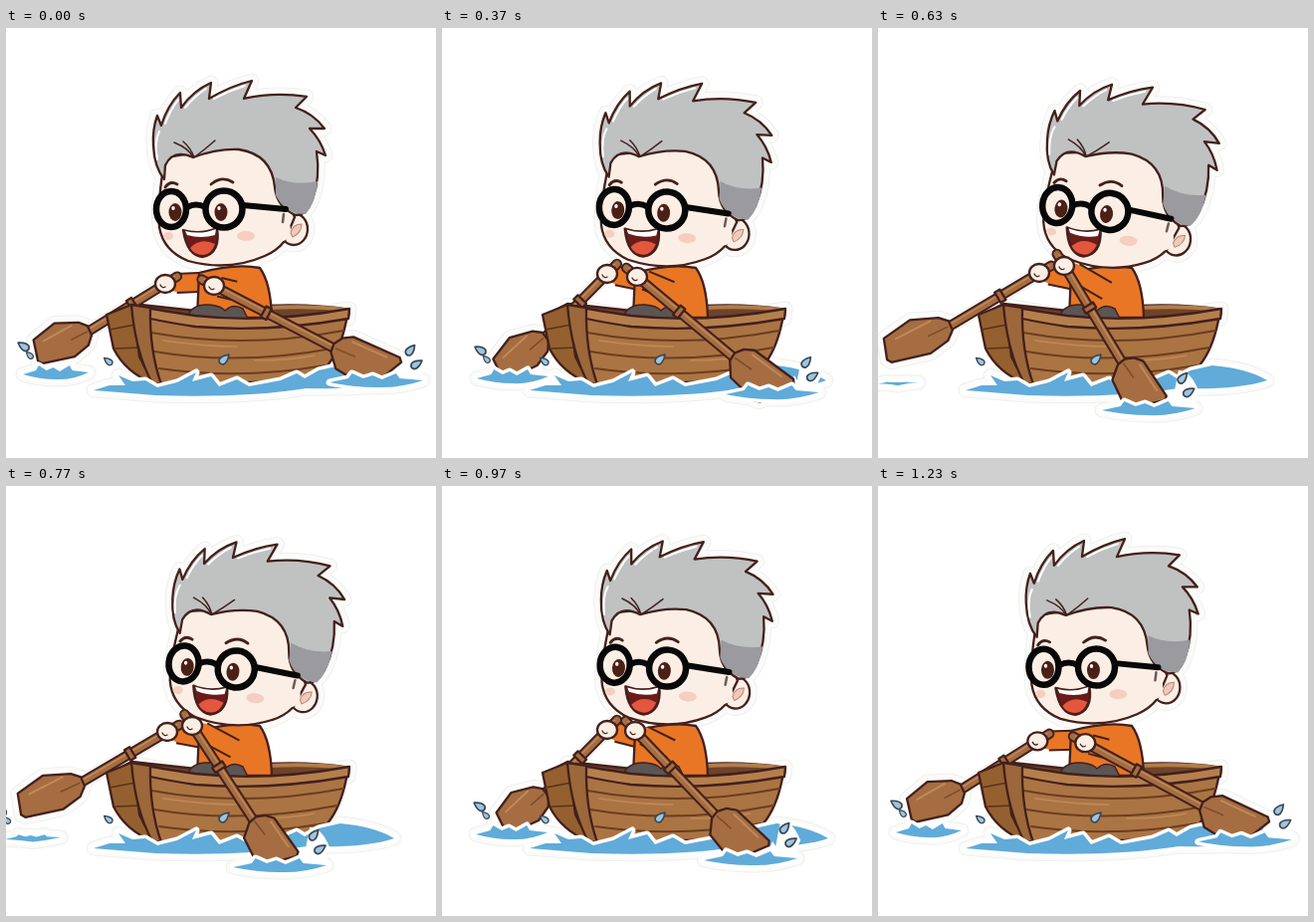
Recreate the animation shown at these times as an HTML page with a canvas. Size 432 px wide and 432 px high, loop 1260 ms.

```html
<!DOCTYPE html>
<html lang="en">
<head>
<meta charset="utf-8">
<title>Rowing</title>
<style>
  html, body { margin: 0; width: 100%; height: 100%; overflow: hidden; background: #fff; }
  canvas { display: block; width: 432px; height: 432px; }
</style>
</head>
<body>
<canvas id="stage"></canvas>
<script>
const canvas = document.getElementById('stage');
const ctx = canvas.getContext('2d');
const ratio = window.devicePixelRatio || 1;
canvas.width = canvas.height = 432 * ratio;
ctx.lineJoin = ctx.lineCap = 'round';

const LOOP = 1260;
const INK = '#43201c', SKIN = '#fbeee4', ORANGE = '#e87625', WOOD = '#a56d41', SHINE = '#c08a58', BLUE = '#60abd9';

// Pose values at the key times; the loop closes on the first one.
const times = [0, 170, 370, 630, 770, 970];
const tracks = {
  lean: [0, .5, 3.3, 6.8, 6, 3.7],
  nearHandX: [209, 202, 196, 187, 187, 194],
  nearHandY: [259, 256, 250, 239, 241, 246],
  nearNeckX: [328, 314, 292, 245, 248, 274],
  nearNeckY: [321, 325, 330, 335, 335, 330],
  nearLength: [68, 68, 65, 56, 55, 60],
  nearPoolX: [372, 350, 332, 272, 275, 310],
  nearPoolY: [354, 356, 366, 382, 381, 374],
  farHandX: [160, 163, 166, 162, 162, 166],
  farHandY: [257, 252, 247, 246, 247, 245],
  farNeckX: [84, 99, 104, 73, 77, 104],
  farNeckY: [304, 308, 310, 299, 297, 308],
  farLength: [58, 60, 58, 70, 68, 54],
  farPoolX: [50, 66, 71, 20, 27, 70],
  farPoolY: [346, 347, 350, 356, 353, 348],
  farPoolW: [33, 37, 36, 21, 28, 36],
  shoreX: [418, 404, 386, 391, 390, 388]
};

// Periodic cubic interpolation through unevenly spaced keys.
function sample(values, t) {
  const n = times.length;
  let i = n - 1;
  while (times[i] > t) i--;
  const at = k => times[(k + n) % n] + LOOP * Math.floor(k / n);
  const val = k => values[(k + n) % n];
  const slope = k => (val(k + 1) - val(k - 1)) / (at(k + 1) - at(k - 1));
  const d = at(i + 1) - at(i), u = (t - at(i)) / d, v = 1 - u;
  return val(i) * v * v * (1 + 2 * u) + val(i + 1) * u * u * (3 - 2 * u)
    + d * u * v * (slope(i) * v - slope(i + 1) * u);
}

function shape(path, fill, stroke, width = 2.3) {
  const p = new Path2D(path);
  if (fill) { ctx.fillStyle = fill; ctx.fill(p); }
  if (stroke) { ctx.strokeStyle = stroke; ctx.lineWidth = width; ctx.stroke(p); }
}

function oval(x, y, rx, ry, fill, stroke, width = 2.3) {
  const p = new Path2D();
  p.ellipse(x, y, rx, ry, 0, 0, 7);
  shape(p, fill, stroke, width);
}

function placed(x, y, angle, draw) {
  ctx.save();
  ctx.translate(x, y);
  ctx.rotate(angle);
  draw();
  ctx.restore();
}

function leaning(pose, draw) {
  placed(206, 300, pose.lean * Math.PI / 180, () => {
    ctx.translate(-206, -300);
    draw();
  });
}

const hair = 'M159 152Q149 140 148 118Q147 102 152 88L156 98Q162 78 175 65L176 80Q188 63 206 55L204 71Q226 58 247 53L239 71Q270 64 302 69L291 80Q309 86 320 101L305 101Q316 112 321 128L312 124Q316 150 308 172Q302 188 291 188Q272 180 270 160Q267 127 234 122Q212 121 188 130Q168 121 160 138Z';
const face = 'M160 130Q152 172 154 200Q158 224 183 234Q224 245 260 229Q272 224 280 214L290 190L271 150Q262 118 230 119Z';
const hull = 'M128 284Q190 298 262 300Q310 298 343 288Q338 318 326 335Q316 350 290 354L160 360Q142 350 134 330Z';
const bowSide = 'M101 288L126 278L148 357Q120 346 108 322Z';
const rim = 'M126 278Q150 283 190 289Q262 297 345 282L344 292Q265 306 190 300Q150 294 129 288Z';

function head() {
  oval(289, 202, 14, 16, SKIN, INK);
  shape(face, SKIN, INK);
  oval(278, 203, 8, 11, SKIN);
  shape('M286 206Q288 197 297 197Q297 206 288 210Z', '#f0c9ba', '#b98476', 1);
  shape(hair, '#c0c2c2', INK);
  shape('M152 132Q149 114 154 104M160 96Q165 82 173 72M180 80Q190 68 201 61M209 71Q224 63 240 58', null, '#fff', 2);
  shape('M271 150Q290 159 313 154Q311 176 301 187Q280 187 271 168Z', '#9b9a9f');
  shape('M169 115Q184 121 188 130M178 114Q186 121 189 130M189 130Q200 122 210 113', null, INK, 1.5);
  shape('M160 160Q165 153 172 157M206 157Q217 148 228 155', null, INK, 2.8);

  oval(241, 209, 9, 5, '#f5cdc1');
  oval(163, 209, 5, 4, '#f5cdc1');
  shape('M178 203Q195 208 212 201Q216 226 198 230Q182 229 178 203Z', '#6b1c1a', INK);
  shape('M180 204Q196 208 211 202L210 208Q196 212 182 208Z', '#fff');
  shape('M185 221Q195 210 210 217Q206 228 198 228Q189 228 185 221Z', '#e2573d');

  oval(166, 182, 15, 18, SKIN, '#080808', 6.5);
  oval(219, 182, 18.5, 18.5, SKIN, '#080808', 6.5);
  shape('M182 180Q191 175 200 180M238 178L281 182', null, '#080808', 6);
  shape('M279 187L278 195', null, '#6d5a58', 2.5);
  for (const x of [170, 216]) {
    oval(x, 185, 6.5, 9, '#4a2017');
    oval(x - 2, 181, 1.7, 2, '#fff');
  }
}

const blades = {
  near: [[0, -4], [6, -12], [16, -17], [66, -13], [69, -9], [49, 24], [44, 26], [10, 19], [0, 5]],
  far: [[0, -5], [8, -12], [34, -21], [64, -14], [69, 7], [66, 11], [28, 18], [8, 13], [0, 5]]
};

function bladePath(side, length) {
  return 'M' + blades[side].map(([x, y]) => `${x * length / 67} ${y}`).join('L') + 'Z';
}

// Maps the oar to its own axis: hand on the left, neck at the origin.
function withOar(pose, side, draw) {
  const get = name => pose[side + name];
  const dx = get('NeckX') - get('HandX'), dy = get('NeckY') - get('HandY');
  placed(get('NeckX'), get('NeckY'), Math.atan2(dy, dx), () => {
    if (side === 'far') ctx.scale(1, -1);
    draw(Math.hypot(dx, dy), get('Length'));
  });
}

function oar(pose, side) {
  withOar(pose, side, (reach, length) => {
    const shaft = `M${-reach - 14} 0L4 0`;
    shape(shaft, null, INK, 10.5);
    shape(shaft, null, WOOD, 6.5);
    shape(`M${-reach - 12}-1.5L0-1.5`, null, SHINE, 1.5);
    shape(`M${-reach * .56 - 3}-6h6v12h-6Z`, WOOD, INK);
    ctx.rotate(-.14);
    shape(bladePath(side, length), WOOD, INK);
    shape(`M${length * .25}-12L${length * .8}-9`, null, SHINE, 2);
    shape(`M${length * .05} 0L${length * .35} 1`, null, '#7b4a28', 1.5);
  });
}

function waterPath(x) {
  return `M88 364L104 359L120 359L113 349L127 355L140 354L152 361L172 356L191 346L187 355L206 350L214 360L232 353L244 360L276 354L292 347L300 352L314 344L336 339Q${x - 20} 342 ${x} 354Q360 364 302 362Q240 372 150 369Z`;
}

function poolPath(x, y, w) {
  const k = Math.min(1, (w / 33) ** 6);
  const points = [[-.6, -2], [-.52, -7], [-.28, -2], [-.08, -5], [.12, -1], [.42, -7], [.5, -2]];
  return `M${x - w} ${y + 2}` + points.map(([u, v]) => `L${x + u * w} ${y + v * k}`).join('')
    + `L${x + w} ${y}Q${x + w / 2} ${y + 8 * k} ${x} ${y + 3 + 4 * k}Q${x - w / 2} ${y + 7 * k} ${x - w} ${y + 2}Z`;
}

function water(path) {
  shape(path, null, '#fff', 7);
  shape(path, BLUE);
}

function spray(x, y) {
  placed(x, y, 0, () => shape('M2 2L12-8L16-5L22-17L25-12L30-38Q42-38 50-18L46-10L50 0Z', '#fff'));
}

function drop(x, y, angle, size = 1) {
  placed(x, y, angle, () => {
    ctx.scale(size, size);
    shape('M0-7Q5 0 3 4Q0 7-3 4Q-5 0 0-7Z', '#9cc5de', '#3b4654', 1.7);
  });
}

function arm(x, y, handX, handY) {
  const path = `M${x} ${y}L${handX + (x - handX) * .25} ${handY + (y - handY) * .25}`;
  ctx.lineCap = 'butt';
  shape(path, null, INK, 21);
  ctx.lineCap = 'round';
  shape(path, null, ORANGE, 17);
}

function hand(x, y) {
  oval(x, y, 10, 9, SKIN, INK);
  shape(`M${x - 5} ${y + 1}Q${x - 3} ${y + 5} ${x} ${y + 3}`, null, INK, 1.3);
}

// Pale sticker border around every part.
function border(pose, pools, color, extra) {
  const edge = path => shape(path, null, color, extra);
  leaning(pose, () => {
    edge(hair);
    edge(face);
    oval(289, 202, 14, 16, null, color, extra);
  });
  [rim, waterPath(pose.shoreX), ...pools].forEach(edge);
  for (const side of ['far', 'near']) {
    withOar(pose, side, (reach, length) => {
      edge(`M${-reach - 10} 0L0 0`);
      ctx.rotate(-.14);
      edge(bladePath(side, length));
    });
  }
}

function boatBack() {
  shape('M103 289L126 277L190 284L262 279Q310 277 345 283L344 290L262 300L150 290Z', '#6d432a', INK);
  shape('M264 281Q310 279 340 283', null, '#b27c4b', 4);
}

function torso() {
  shape('M194 246Q230 236 255 241Q266 256 267 291L192 291Z', ORANGE, INK);
  shape('M182 291Q186 277 204 278Q216 279 220 284Q228 276 238 282L244 294Z', '#5b5554', INK, 1.5);
}

function boatFront() {
  shape(bowSide, '#94602f', INK);
  shape('M104 303L130 298M110 322L136 321', null, '#5c3119', 1.7);
  shape(hull, '#ab7443', INK);
  shape('M146 306Q240 323 339 304M149 325Q235 340 333 321M154 342Q235 354 320 339', null, '#6b3d20', 2);
  shape('M158 314Q200 320 232 320M250 334Q285 334 310 329', null, SHINE, 1.5);
  shape(rim, '#b57f4d', INK);
  shape('M126 278L145 281Q144 324 156 358L147 357Q130 326 126 278Z', '#9c673a', INK);
}

function render(t) {
  const pose = {};
  for (const name in tracks) pose[name] = sample(tracks[name], t);
  const { nearPoolX, nearPoolY, farPoolX, farPoolY } = pose;
  const nearPool = poolPath(nearPoolX, nearPoolY, 47);
  const farPool = poolPath(farPoolX, farPoolY, pose.farPoolW);

  ctx.setTransform(ratio, 0, 0, ratio, 0, 0);
  ctx.fillStyle = '#fff';
  ctx.fillRect(0, 0, 432, 432);
  border(pose, [nearPool, farPool], '#eeefec', 15);
  border(pose, [nearPool, farPool], '#fbfcfa', 13);

  boatBack();
  arm(205, 255, pose.farHandX, pose.farHandY);
  torso();
  oar(pose, 'far');
  water(farPool);
  boatFront();
  leaning(pose, head);
  arm(230, 264, pose.nearHandX, pose.nearHandY);
  water(waterPath(pose.shoreX));
  spray(nearPoolX, nearPoolY);
  oar(pose, 'near');
  water(nearPool);
  hand(pose.farHandX, pose.farHandY);
  hand(pose.nearHandX, pose.nearHandY);

  drop(nearPoolX + 34, nearPoolY - 30, .7);
  drop(nearPoolX + 40, nearPoolY - 16, 1);
  drop(farPoolX - 32, farPoolY - 26, -1);
  drop(farPoolX - 26, farPoolY - 17, -.8, .7);
  drop(103, 335, -.9, .8);
  drop(219, 333, .8);
}

function tick() {
  render(performance.now() % LOOP);
  requestAnimationFrame(tick);
}
tick();
</script>
</body>
</html>
```
